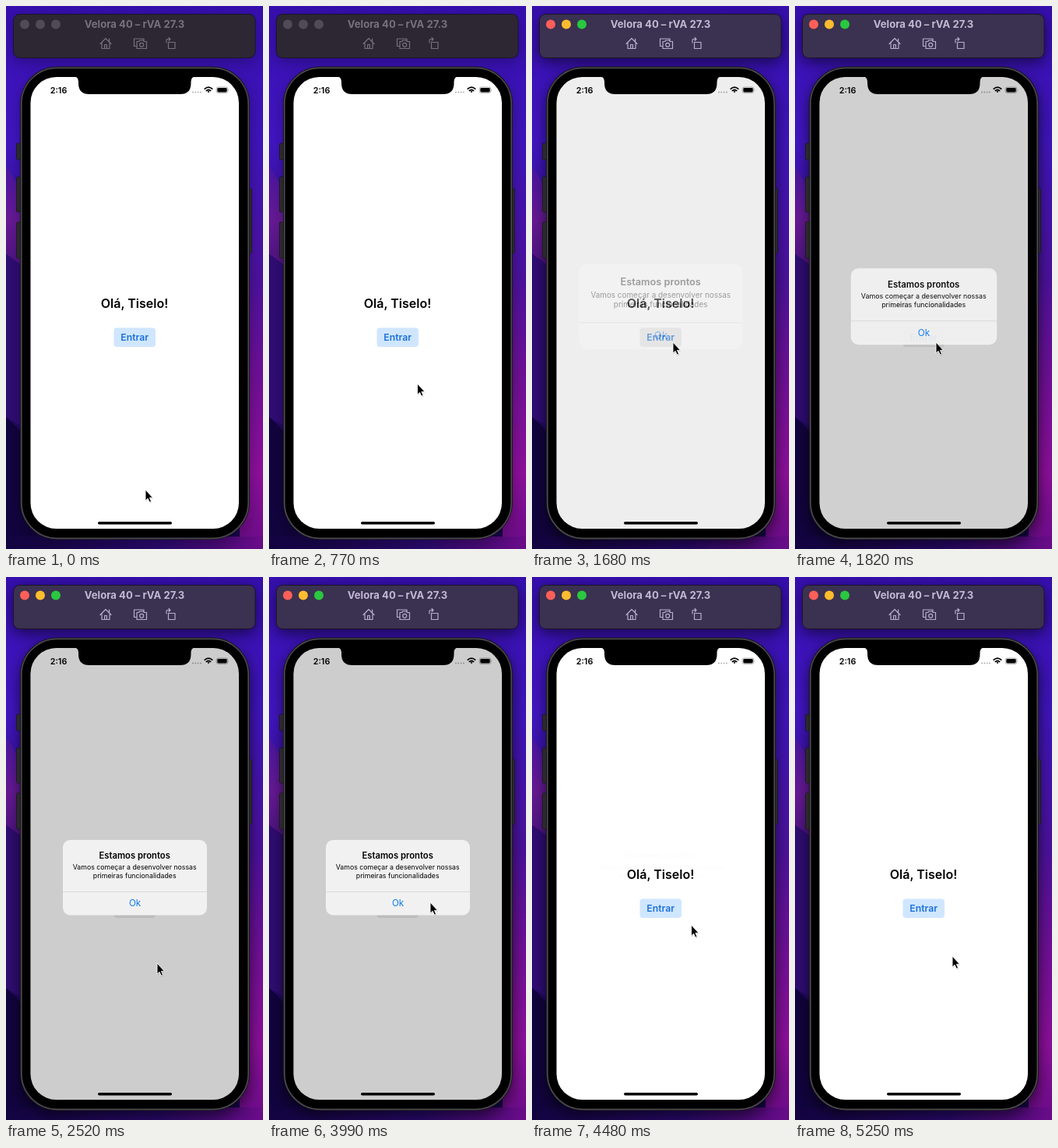
Write an HTML page that moves like this. It is 330x696 px and loops after 5460 ms.

```html
<!DOCTYPE html>
<html lang="pt">
<head>
<meta charset="utf-8">
<title>Alerta</title>
<style>
  html, body { margin: 0; width: 100%; height: 100%; overflow: hidden; background: #250b78; }
  svg { display: block; width: 330px; height: 696px; font-family: Inter, Roboto, sans-serif; }
  text { text-anchor: middle; }
</style>
</head>
<body>
<svg viewBox="0 0 330 696">
  <defs>
    <linearGradient id="sky" x2="0" y2="1">
      <stop offset="0" stop-color="#360fae"/>
      <stop offset=".25" stop-color="#4216c4"/>
      <stop offset=".42" stop-color="#35108f"/>
      <stop offset="1" stop-color="#17054a"/>
    </linearGradient>
    <linearGradient id="rightSky" x2="0" y2="1">
      <stop offset="0" stop-color="#360fae"/>
      <stop offset=".25" stop-color="#3f15bc"/>
      <stop offset=".5" stop-color="#4c129e"/>
      <stop offset=".68" stop-color="#701098"/>
      <stop offset=".86" stop-color="#8e109c"/>
      <stop offset="1" stop-color="#6a0c88"/>
    </linearGradient>
    <linearGradient id="hill" x2="0" y2="1">
      <stop offset="0" stop-color="#4a16a4"/>
      <stop offset=".5" stop-color="#681a96"/>
      <stop offset="1" stop-color="#48127c"/>
    </linearGradient>
    <linearGradient id="floor">
      <stop offset="0" stop-color="#12043f"/>
      <stop offset=".6" stop-color="#2c0a74"/>
      <stop offset="1" stop-color="#6a0c88"/>
    </linearGradient>
    <filter id="blur" x="-30%" y="-50%" width="160%" height="200%">
      <feGaussianBlur stdDeviation="10"/>
    </filter>
  </defs>

  <rect width="330" height="696" fill="url(#sky)"/>
  <rect x="300" width="30" height="696" fill="url(#rightSky)"/>
  <path d="M0 205Q14 225 30 260V345L0 318Z" fill="url(#hill)"/>
  <path d="M0 318Q16 328 40 350V550L0 527Z" fill="#300d74"/>
  <path d="M0 527Q16 540 40 570V696H0Z" fill="#12043f"/>
  <rect y="680" width="330" height="16" fill="url(#floor)"/>

  <g id="shadow">
    <rect x="10" y="16" width="310" height="56" rx="8" filter="url(#blur)"/>
    <rect x="18" y="86" width="295" height="606" rx="47" filter="url(#blur)"/>
  </g>

  <rect id="bar" x="9.500" y="10.500" width="310.500" height="56" rx="8" stroke="#1b1426"/>
  <circle class="light" cx="24" cy="23.500" r="6"/>
  <circle class="light" cx="44" cy="23.500" r="6"/>
  <circle class="light" cx="64" cy="23.500" r="6"/>
  <text id="caption" x="165" y="28" font-size="13.100" font-weight="700">Velora 40 – rVA 27.3</text>
  <g id="icons" fill="none" stroke-width="1.200" stroke-linejoin="round" stroke-linecap="round">
    <path d="M121 48.500L128 41.500L135 48.500M123 47.500V54.500H133V47.500M126.600 54V49.500H129.400V54M132.600 45V42"/>
    <path d="M167 51.500H164.500V42H177V44M168 45.500H170.500L172 44H176L177.500 45.500H180.500V54.500H168Z"/>
    <circle cx="174.200" cy="49.800" r="2.500"/>
    <path d="M208.500 46.500H217V54.500H208.500ZM206 47V43.500Q206 42.500 207 42.500H211M209 40.500L211 42.500L209 44.500"/>
  </g>

  <g fill="#2b292e" stroke="#17151b" stroke-width=".7">
    <rect x="13.500" y="176" width="6" height="21" rx="1.500"/>
    <rect x="13.500" y="219" width="6" height="45" rx="1.500"/>
    <rect x="13.500" y="277" width="6" height="46" rx="1.500"/>
    <rect x="310" y="234" width="5.500" height="83" rx="1.500"/>
  </g>
  <rect x="18.500" y="78" width="294" height="605.500" rx="47" stroke="#17161a"/>
  <rect x="19.800" y="79.300" width="291.400" height="603" rx="46" fill="none" stroke="#4b494d" stroke-width="1.700"/>
  <rect x="31.500" y="91" width="267.500" height="579" rx="33" fill="#fff"/>

  <text x="165" y="386.500" font-size="16" font-weight="600">Olá, Tiselo!</text>
  <rect id="button" x="138.500" y="412.500" width="53.500" height="24.500" rx="4"/>
  <text id="enter" x="165.200" y="429" font-size="12.200" font-weight="600" fill="#1a71da">Entrar</text>

  <text x="67.500" y="112" font-size="10.800" font-weight="600">2:16</text>
  <g fill="#aaa">
    <circle cx="240" cy="110.500" r=".9"/><circle cx="243.300" cy="110.500" r=".9"/>
    <circle cx="246.600" cy="110.500" r=".9"/><circle cx="249.900" cy="110.500" r=".9"/>
  </g>
  <g fill="none" stroke="#000" stroke-width="1.700">
    <path d="M254.700 106.700Q260 101.700 265.300 106.700M256.800 109Q260 106 263.200 109"/>
    <path d="M258.600 109.700Q260 108.500 261.400 109.700L260 111.300Z" fill="#000" stroke="none"/>
  </g>
  <rect x="270.200" y="104" width="14.600" height="7.400" rx="2.200" fill="none" stroke="#999" stroke-width=".8"/>
  <rect x="271.300" y="105" width="12.400" height="5.400" rx="1.400"/>
  <path d="M285.800 106.500Q287 107.700 285.800 109Z" fill="#999"/>

  <rect id="dim" x="31.500" y="91" width="267.500" height="579" rx="33"/>
  <path d="M87 90Q93 91 93 97V99Q93 113 107 113H223.500Q237.500 113 237.500 99V97Q237.500 91 243.500 90Z"/>
  <rect x="118" y="661" width="95" height="3.400" rx="1.700"/>

  <g id="alert">
    <rect id="panel" x="73" y="337" width="185" height="96.500" rx="9.500"/>
    <path d="M73 403.500H258" stroke="#d3d3d3" stroke-width=".8"/>
    <text x="165.200" y="361.300" font-size="11.250" font-weight="600">Estamos prontos</text>
    <g font-size="8.750">
      <text x="165.200" y="375">Vamos começar a desenvolver nossas</text>
      <text x="165.200" y="386.300">primeiras funcionalidades</text>
    </g>
    <text x="165.500" y="422.300" font-size="11.600" fill="#0b78f0">Ok</text>
  </g>

  <g id="pointer">
    <circle id="ring" r="21.700" fill="none" stroke="#111" stroke-width="1.400"/>
    <path d="M.5 1.300V15.200L3.600 12.400L5.800 17.200L8.300 16.100L6.200 11.500H10.200Z" opacity=".18"/>
    <path d="M0 0V14L3.100 11.200L5.200 15.900L7.500 14.900L5.400 10.300H9.500Z" stroke="#fff" stroke-width=".9"/>
  </g>
</svg>
<script>
const LOOP = 5460, STEP = 70;
const $ = id => document.getElementById(id);
const lights = document.querySelectorAll('.light');

// Pointer stops: time, x, y
const stops = [
  [280, 179, 620], [840, 191, 478], [1400, 181, 431], [1960, 181, 431],
  [2240, 194, 495], [3290, 194, 495], [3920, 207, 417], [4270, 207, 417],
  [4690, 202, 475], [5040, 202, 486]
];

const mix = (a, b, k) => a + (b - a) * k;
const smooth = k => k * k * (3 - 2 * k);
const within = (t, from, to) => t >= from && t < to;
const set = (el, attrs) => {
  for (const name in attrs) el.setAttribute(name, attrs[name]);
};

// Critically damped spring, 0 to 1
function spring(ms) {
  const x = Math.max(0, ms) * 0.0228;
  return 1 - (1 + x) * Math.exp(-x);
}

function pointerAt(t) {
  const next = stops.findIndex(s => s[0] > t);
  if (next === 0) return stops[0].slice(1);
  if (next < 0) return stops[stops.length - 1].slice(1);
  const a = stops[next - 1], b = stops[next];
  const k = smooth((t - a[0]) / (b[0] - a[0]));
  return [mix(a[1], b[1], k), mix(a[2], b[2], k)];
}

// The focused window gets brighter controls and a heavier shadow
function drawWindow(active) {
  const colors = active ? ['#ff5f58', '#febc2e', '#29c840'] : Array(3).fill('#504b56');
  lights.forEach((light, i) => set(light, { fill: colors[i] }));
  set($('bar'), { fill: active ? '#3b3150' : '#2c2733' });
  set($('caption'), { fill: active ? '#c3b9d3' : '#77717d' });
  set($('icons'), { stroke: active ? '#b9aecb' : '#77717d' });
  set($('shadow'), { opacity: active ? 0.6 : 0.3 });
}

function draw(t) {
  const shown = spring(t - 1627), gone = spring(t - 4171);
  const level = shown * (1 - gone);

  drawWindow(t >= 1540);
  set($('button'), { fill: within(t, 1627, 4171) ? '#eaeaea' : '#d0e6ff' });
  set($('enter'), { opacity: within(t, 1470, 1627) ? 0.8 : 1 });
  set($('dim'), { opacity: 0.196 * level });

  const scale = mix(1.2, 1, shown);
  const white = Math.round(mix(255, 241, level));
  set($('panel'), { fill: `rgb(${white},${white},${white})` });
  set($('alert'), {
    opacity: level,
    transform: `translate(165.5 385.2) scale(${scale}) translate(-165.5 -385.2)`
  });

  const [x, y] = pointerAt(t);
  set($('pointer'), { transform: `translate(${x} ${y})` });
  set($('ring'), { opacity: within(t, 1470, 1680) || within(t, 4060, 4200) ? 1 : 0 });
}

const start = performance.now();
function tick() {
  const t = (performance.now() - start) % LOOP;
  draw(Math.floor(t / STEP) * STEP);
  requestAnimationFrame(tick);
}
tick();
</script>
</body>
</html>
```
